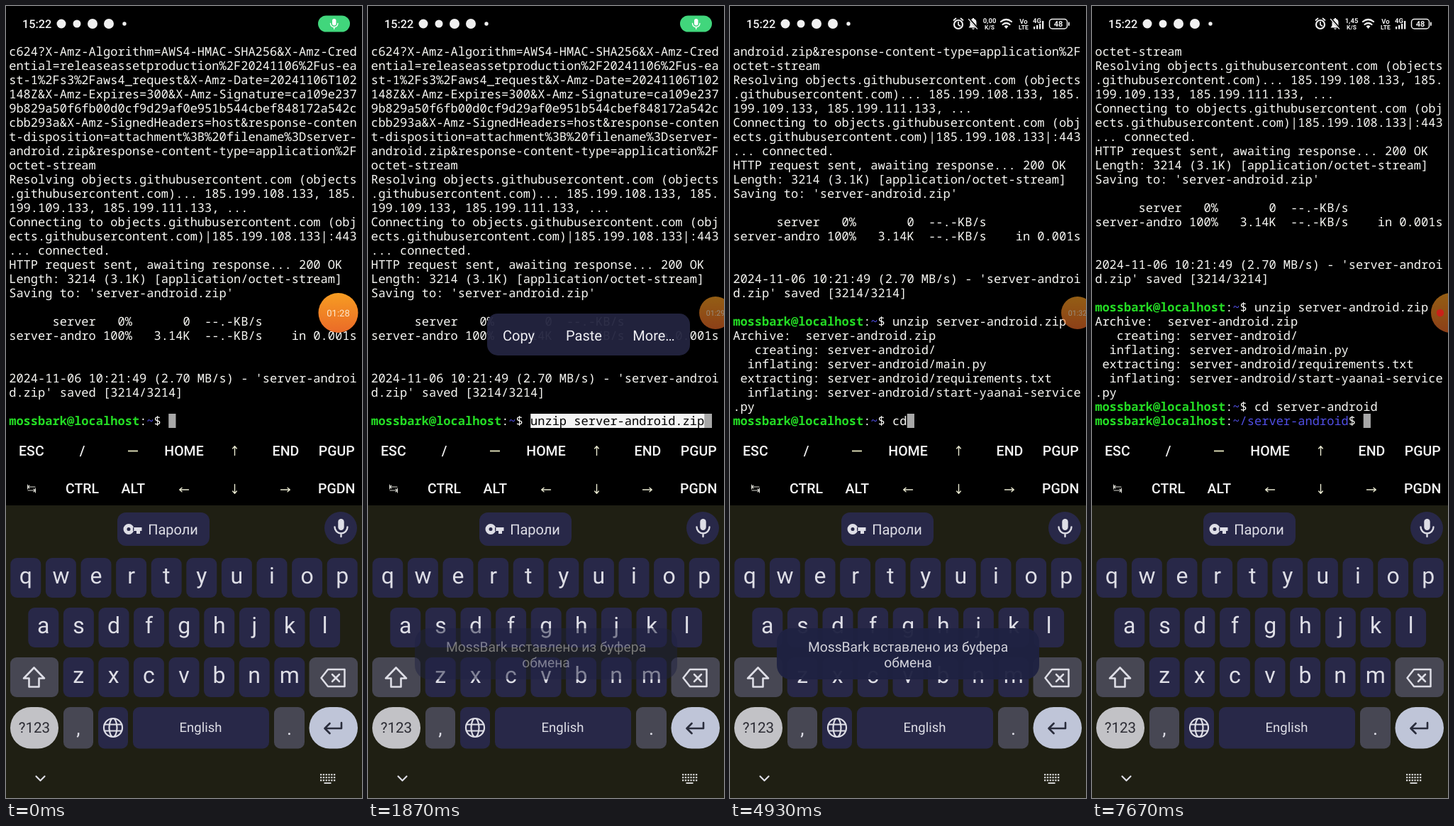
An HTML page for the animation above (7710 ms loop, 502 px wide and 1115 px high).

```html
<!DOCTYPE html>
<html lang="en">
<head>
<meta charset="utf-8">
<title>Terminal session</title>
<style>
html, body { margin: 0; width: 100%; height: 100%; overflow: hidden; background: #000; }
svg { display: block; width: 100vw; height: 100vh; text-rendering: geometricPrecision; }
text { font-family: Roboto, "Noto Sans", sans-serif; white-space: pre; }
#term text { font: 17.05px "Noto Sans Mono", "DejaVu Sans Mono", monospace; fill: #f8f8f4; }
#term .user { font-weight: 700; fill: #24dd24; }
#term .path { fill: #514fe6; }
.mid { text-anchor: middle; }
.line { fill: none; stroke-linecap: round; stroke-linejoin: round; }
</style>
</head>
<body>
<svg id="stage" viewBox="0 0 502 1115" preserveAspectRatio="none">
  <defs>
    <linearGradient id="orange" x1="0" y1="0" x2="0" y2="1">
      <stop offset="0" stop-color="#f79d22"/><stop offset="1" stop-color="#ea6a28"/>
    </linearGradient>
  </defs>
  <rect width="502" height="1115" fill="#000"/>

  <g id="status" fill="#f0f0f0">
    <text x="23" y="31" font-size="16.300" font-weight="500">15:22</text>
    <circle cx="78" cy="25" r="6.5"/><circle cx="100" cy="25" r="5.5"/>
    <circle cx="122" cy="25" r="7"/><circle cx="145" cy="25" r="7"/>
    <circle cx="167" cy="25" r="2.7"/>
  </g>
  <g id="micPill">
    <rect x="440" y="13.500" width="45" height="23" rx="11.500" fill="#41d67c"/>
    <rect x="460" y="18" width="5.500" height="9.500" rx="2.750" fill="#fff"/>
    <path class="line" d="M457.500 24.500a5.200 5.200 0 0 0 10.400 0M462.700 29.800v2.500" stroke="#fff" stroke-width="1.400"/>
  </g>
  <g id="icons" fill="#f0f0f0">
    <g class="line" stroke="#f0f0f0" stroke-width="2.200">
      <circle cx="322" cy="26" r="6"/>
      <path d="M322 22.500v4l2.500 1.500M315.500 20l3-2.500M328.500 20l-3-2.500" stroke-width="1.700"/>
    </g>
    <path d="M336.500 30.500h13l-2-3v-4.500q0-4-3.500-5v-1h-2v1q-3.500 1-3.500 5v4.500zM341 31.500h4q-2 3-4 0z"/>
    <path class="line" d="M337 18l12.500 14" stroke="#000" stroke-width="2.800"/>
    <path class="line" d="M336.500 18.500l12 13.500" stroke="#f0f0f0" stroke-width="1.300"/>
    <text id="speed" class="mid" x="366" y="24" font-size="9.500" font-weight="700">0,00</text>
    <text class="mid" x="366" y="33" font-size="8.500" font-weight="700">K/S</text>
    <g class="line" stroke="#f0f0f0" stroke-width="2.200">
      <path d="M382 22q7.500-6 15 0M384.500 26q5-4 10 0"/>
    </g>
    <path d="M386.500 28.500q3-2.300 6 0l-3 3.500z"/>
    <text class="mid" x="414" y="24.500" font-size="9.500" font-weight="700">Vo</text>
    <text class="mid" x="414" y="33" font-size="8.500" font-weight="700">LTE</text>
    <text x="427" y="24" font-size="9.500" font-weight="700">4G</text>
    <path d="M428 29h2.300v3.500H428zM432 27h2.300v5.500H432zM436 25h2.300v7.500H436zM440 21h2.300v11.500H440z"/>
    <rect x="450.500" y="18.500" width="25" height="13.500" rx="4" fill="none" stroke="#f0f0f0" stroke-width="1.500"/>
    <rect x="477" y="22.500" width="1.800" height="5.500" rx=".9"/>
    <text class="mid" x="463" y="29.300" font-size="11" font-weight="700">48</text>
  </g>

  <g id="term"></g>
  <g id="extra"></g>
  <g id="keyboard"></g>

  <g id="toast">
    <rect x="66" y="876" width="370" height="72" rx="20" fill="#1f2242" fill-opacity=".96"/>
    <g class="mid" fill="#d2d2da" font-size="19.300">
      <text x="251" y="908.500">MossBark вставлено из буфера</text>
      <text x="251" y="931">обмена</text>
    </g>
  </g>

  <g id="handles">
    <rect x="311" y="494" width="10.300" height="20" fill="#fff"/>
    <path d="M294 510h13q4 0 4 4v13a17 17 0 1 1-17-17zM338 510h-13q-4 0-4 4v13a17 17 0 1 0 17-17z" fill="#2391fb"/>
  </g>
  <g id="menu">
    <rect x="168" y="433" width="286" height="59" rx="15" fill="#232440" fill-opacity=".95"/>
    <g class="mid" fill="#f0f0f4" font-size="20">
      <text x="212.500" y="470.500">Copy</text><text x="304.500" y="470.500">Paste</text><text x="403" y="470.500">More…</text>
    </g>
  </g>

  <g id="bubble">
    <circle r="28" fill="url(#orange)"/>
    <text id="clock" class="mid" y="4.500" font-size="13" fill="#fff3e0"></text>
  </g>
  <circle id="dot" cx="491" cy="432" r="5.200" fill="#d01c18"/>
</svg>
<script>
const $ = id => document.getElementById(id);
const LOOP = 7710;
const ROWS = 27, CELL = 10.23, LEFT = 4.2;

const LOG = `c624?X-Amz-Algorithm=AWS4-HMAC-SHA256&X-Amz-Cred
ential=releaseassetproduction%2F20241106%2Fus-ea
st-1%2Fs3%2Faws4_request&X-Amz-Date=20241106T102
148Z&X-Amz-Expires=300&X-Amz-Signature=ca109e237
9b829a50f6fb00d0cf9d29af0e951b544cbef848172a542c
cbb293a&X-Amz-SignedHeaders=host&response-conten
t-disposition=attachment%3B%20filename%3Dserver-
android.zip&response-content-type=application%2F
octet-stream
Resolving objects.githubusercontent.com (objects
.githubusercontent.com)... 185.199.108.133, 185.
199.109.133, 185.199.111.133, ...
Connecting to objects.githubusercontent.com (obj
ects.githubusercontent.com)|185.199.108.133|:443
... connected.
HTTP request sent, awaiting response... 200 OK
Length: 3214 (3.1K) [application/octet-stream]
Saving to: 'server-android.zip'

      server   0%       0  --.-KB/s
server-andro 100%   3.14K  --.-KB/s    in 0.001s


2024-11-06 10:21:49 (2.70 MB/s) - 'server-androi
d.zip' saved [3214/3214]
`.split('\n');
const FILES = `   creating: server-android/
  inflating: server-android/main.py
 extracting: server-android/requirements.txt
  inflating: server-android/start-yaanai-service
.py`.split('\n');
const USER = 'mossbark@localhost';
const UNZIP = 'unzip server-android.zip';

const AT = { menu: 1000, paste: 1700, enter: 2600, archive: 2700, files: 3100, hide: 5100, cd: 7060 };
const TYPING = [[4430, 'c'], [4700, 'cd'], [4970, 'cd '], [5330, 'cd s'], [6000, 'cd server-android']];

const clamp = v => Math.max(0, Math.min(1, v));
const ramp = (t, a, b) => clamp((t - a) / (b - a));
const pulse = (t, a, b, c, d) => Math.min(ramp(t, a, b), 1 - ramp(t, c, d));
const escape = s => s.replace(/&/g, '&amp;').replace(/</g, '&lt;');
const prompt = (cmd, path = '~') => ({ cmd, path });

function screen(t) {
  const lines = [...LOG, prompt(t < AT.paste ? '' : UNZIP)];
  if (t >= AT.archive) lines.push('Archive:  server-android.zip');
  if (t >= AT.files) {
    const typed = TYPING.filter(step => t >= step[0]).pop();
    lines.push(...FILES, prompt(typed ? typed[1] : ''));
    if (t >= AT.cd) lines.push(prompt('', '~/server-android'));
  } else if (t >= AT.enter) lines.push('');
  return lines.slice(-ROWS);
}

function drawTerminal(t) {
  const lit = t >= AT.paste && t < AT.enter;
  let out = '', col = 0;
  screen(t).forEach((line, i) => {
    const y = 70 + i * 20;
    let body = '';
    if (typeof line === 'string') {
      col = line.length;
      body = escape(line);
    } else {
      const start = USER.length + line.path.length + 3;
      col = start + line.cmd.length;
      const hot = lit && line.cmd;
      if (hot) out += `<rect x="${LEFT + start * CELL}" y="574" width="${line.cmd.length * CELL}" height="20" fill="#f4f4f4"/>`;
      body = `<tspan class="user">${USER}</tspan>:<tspan class="path">${line.path}</tspan>$ ` +
        `<tspan${hot ? ' fill="#000"' : ''}>${line.cmd}</tspan>`;
    }
    out += `<text x="${LEFT}" y="${y}">${body}</text>`;
  });
  return out + `<rect x="${LEFT + col * CELL}" y="574" width="${CELL}" height="20" fill="#a8a8a8"/>`;
}

function drawExtra() {
  const label = (s, x, y) => `<text class="mid" x="${x}" y="${y + 7}" font-size="19.500" font-weight="500" fill="#f4f4f4">${s}</text>`;
  const arrow = (x, y, turn) => `<path class="line" transform="translate(${x} ${y}) rotate(${turn})" d="M-6.500 0H6M3 -2.800L6.300 0L3 2.800" stroke="#e8e8d0" stroke-width="1.400"/>`;
  const top = ['ESC', '/', '', 'HOME', '', 'END', 'PGUP'];
  const low = ['', 'CTRL', 'ALT', '', '', '', 'PGDN'];
  const x = i => (i + 0.5) * 502 / 7;
  return top.map((s, i) => label(s, x(i), 626)).join('') + low.map((s, i) => label(s, x(i), 679)).join('') +
    '<path d="M172 626.500h14" stroke="#e8e8c0" stroke-width="1.800"/>' +
    arrow(322.5, 626, -90) + arrow(251, 681, 180) + arrow(322.5, 680, 90) + arrow(394, 681, 0) +
    '<path class="line" d="M31 677h10M33 675l-2.500 2 2.500 2M30.500 674v6M31 682h10M39 680l2.500 2-2.500 2M41.500 679v6" stroke="#d8d8d0" stroke-width="1.100"/>';
}

function drawKeyboard() {
  const KEY = '#282848', GRAY = '#474753', INK = '#dedee6';
  const box = (x, y, w, h, fill, r = 9) => `<rect x="${x}" y="${y}" width="${w}" height="${h}" rx="${r}" fill="${fill}"/>`;
  const say = (s, x, y, size, fill = INK) => `<text class="mid" x="${x}" y="${y}" font-size="${size}" fill="${fill}">${s}</text>`;
  const stroke = (d, w, color = INK) => `<path class="line" d="${d}" stroke="${color}" stroke-width="${w}"/>`;
  const row = (keys, x, y) => [...keys].map((k, i) => {
    const cx = x + i * 49.6;
    return box(cx - 21.5, y, 43, 56, KEY) + say(k, cx, y + 36, 32);
  }).join('');

  let out = box(0, 703, 502, 412, '#1f1f13', 0);
  out += box(157, 713, 130, 47, KEY, 12) + say('Пароли', 235.5, 743.5, 20);
  out += `<path d="M173 729a7.500 7.500 0 1 1 0 15a7.500 7.500 0 0 1 0-15zm0 5a2.500 2.500 0 1 0 0 5a2.500 2.500 0 0 0 0-5zM179 734h12.500v5H189v4h-5v-4h-5z" fill="${INK}" fill-rule="evenodd"/>`;
  out += `<circle cx="472" cy="735" r="23" fill="${KEY}"/>` + box(468.3, 722, 8.4, 16, INK, 4.2) +
    stroke('M463.500 733.500a9 9 0 0 0 18 0M472.500 743v4', 2.4);

  out += row('qwertyuiop', 27.8, 777) + row('asdfghjkl', 52.8, 847) + row('zxcvbnm', 102.2, 917);
  out += box(6, 917, 68, 56, GRAY) + stroke('M39.500 931.500L25 946.500H32.500V958.500H46.500V946.500H54Z', 2.6);
  out += box(427.5, 917, 68.5, 56, GRAY) + stroke('M454 934H477.500V958H454L444.500 946ZM460 941L470 951M470 941L460 951', 2.5);

  out += box(6, 987, 68, 58.5, '#c2c2c6', 29) + say('?123', 40, 1023, 20.5, '#2c2c34');
  out += box(81, 987, 42, 58.5, GRAY) + say(',', 102, 1026, 27);
  out += box(130, 987, 42, 58.5, KEY) +
    stroke('M138 1016a13 13 0 1 0 26 0a13 13 0 1 0-26 0M145.500 1016a5.500 13 0 1 0 11 0a5.500 13 0 1 0-11 0M139.500 1011.500h23M139.500 1020.500h23', 2.2);
  out += box(179, 987, 192, 58.5, KEY) + say('English', 274.5, 1022, 18.5);
  out += box(378, 987, 43, 58.5, GRAY) + say('.', 399.5, 1026, 27);
  out += box(427.5, 987, 68.5, 58.5, '#bfc5d8', 29) + stroke('M473 1009V1017H450M456.500 1010L449.500 1017L456.500 1024', 2.6, '#2a2d3c');

  out += stroke('M42.500 1084.500L48.500 1090.500L54.500 1084.500', 2.2);
  for (let i = 0; i < 18; i++) out += box(443 + i % 6 * 3.8, 1081 + Math.floor(i / 6) * 4, 2.3, 2.3, '#d0d0d0', 0);
  return out + box(448.5, 1093, 10, 2, '#d0d0d0', 0);
}

const show = (id, alpha) => $(id).setAttribute('opacity', alpha);
let shown = '';

// The recorder bubble dims, shrinks toward the edge, then tucks halfway behind it.
function drawBubble(t) {
  const slide = ramp(t, 1430, 1850);
  const tuck = ramp(t, AT.hide, AT.hide + 100);
  const x = 468.5 + 21.5 * slide + 16 * tuck;
  const scale = 1 - 0.18 * (slide - tuck);
  $('bubble').setAttribute('transform', `translate(${x} 432) scale(${scale})`);
  show('bubble', 1 - 0.4 * ramp(t, 1100, 1400));
  $('clock').textContent = '01:' + (28 + Math.max(0, Math.floor((t - 230) / 1000)));
  show('clock', t < AT.hide ? 0.9 : 0);
  show('dot', t < AT.hide ? 0 : 0.9);
}

function render(t) {
  const term = drawTerminal(t);
  if (term !== shown) $('term').innerHTML = shown = term;

  show('micPill', t < 2270 ? 1 : 0);
  show('icons', t < 2270 ? 0 : 1);
  $('speed').textContent = t < 6000 ? '0,00' : '1,45';

  show('handles', t < AT.paste ? ramp(t, AT.menu, AT.menu + 100) : 0);
  show('menu', pulse(t, AT.menu, AT.menu + 150, 1900, 2050));
  show('toast', pulse(t, 1770, 1970, 5530, 5730));
  drawBubble(t);
}

$('extra').innerHTML = drawExtra();
$('keyboard').innerHTML = drawKeyboard();
const begin = performance.now();
function tick() {
  render((performance.now() - begin) % LOOP);
  requestAnimationFrame(tick);
}
tick();
</script>
</body>
</html>
```
